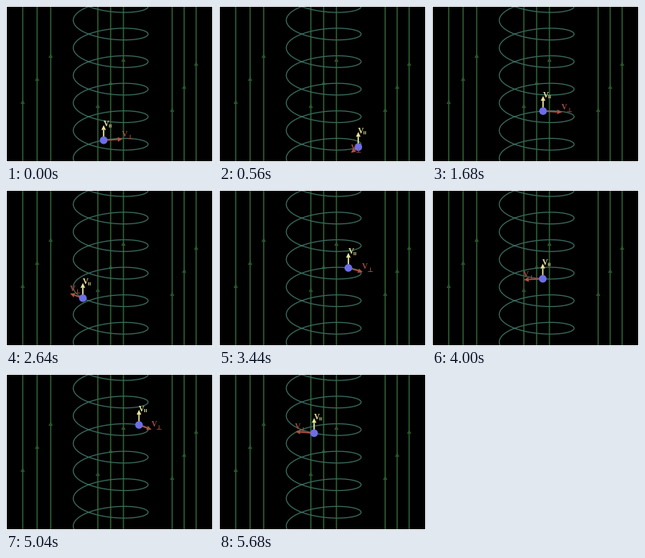
Recreate the animation shown at these times as a matplotlib script. Size 259 by 196 pixels, loop 5760 ms.

```python
import numpy as np
import matplotlib.pyplot as plt
from matplotlib.animation import FuncAnimation
from matplotlib.patches import Circle, Polygon, Rectangle

W, H, DPI = 259, 196, 64
PX = 72 / DPI  # points per pixel
FRAMES, INTERVAL = 72, 80

FIELD, HELIX, BALL = "#28562b", "#38695c", "#6c6ee8"
PARALLEL, PERP, PERP_TEXT = "#e8e59a", "#b4523f", "#a04a3a"

# Helix: centre, horizontal radius, tilt radius, base height, pitch
CX, RX, RY, BASE, PITCH = 131, 46.8, 15, 173.7, 34.6
SPEED = 24
UP = 19

# Phase of the particle along the helix
KEY_FRAMES = [0, 13, 21, 33, 43, 56, 71]
KEY_PHASES = [-1.76, 2.236, 4.883, 8.694, 11.716, 15.91, 20.68]

fig = plt.figure(figsize=(W / DPI, H / DPI), dpi=DPI, facecolor="black")
ax = fig.add_axes([0, 0, 1, 1])
ax.set_xlim(0, W)
ax.set_ylim(H, 0)
ax.axis("off")


def helix(phase):
    x = CX + RX * np.cos(phase)
    y = BASE - PITCH * phase / (2 * np.pi) + RY * np.sin(phase)
    return x, y


def stroke(color, width, z, x=(), y=()):
    line, = ax.plot(x, y, color=color, lw=width * PX, zorder=z,
                    solid_capstyle="butt", snap=False)
    return line


class Arrow:
    def __init__(self, color, z):
        self.shaft = stroke(color, 1.7, z)
        self.head = Polygon(np.zeros((3, 2)), fc=color, lw=0, zorder=z)
        ax.add_patch(self.head)

    def place(self, start, vec):
        start, vec = np.array(start), np.array(vec)
        length = np.hypot(*vec)
        unit = vec / length
        side = np.array([-unit[1], unit[0]]) * 2.9
        tip = start + vec
        neck = tip - unit * min(6, 0.7 * length)
        self.shaft.set_data([start[0], neck[0]], [start[1], neck[1]])
        self.head.set_xy([tip, neck + side, neck - side])


class Label:
    """Letter V with a subscript made of short strokes."""

    def __init__(self, color, strokes, shift, z):
        self.letter = ax.text(0, 0, "V", color=color, fontsize=10 * PX,
                              family="Liberation Serif", weight="bold",
                              ha="center", va="center_baseline", zorder=z)
        self.strokes = strokes
        self.shift = shift
        self.lines = [stroke(color, 0.9, z) for _ in strokes]

    def place(self, x, y):
        self.letter.set_position((x, y))
        sx, sy = x + self.shift[0], y + self.shift[1]
        for line, (x0, y0, x1, y1) in zip(self.lines, self.strokes):
            line.set_data([sx + x0, sx + x1], [sy + y0, sy + y1])


def draw_field():
    groups = [((20, 38, 55), 120), ((114, 130, 146), 125),
              ((207, 222, 237), 130)]
    for xs, top in groups:
        for i, x in enumerate(xs):
            x, y = x + 0.9, top - 29 * i + 0.5
            stroke(FIELD, 1.7, 1, [x, x], [1, H - 1])
            ax.add_patch(Polygon([(x, y - 3), (x - 2.7, y + 2.5),
                                  (x + 2.7, y + 2.5)],
                                 fc=FIELD, lw=0, zorder=1))


draw_field()
stroke(HELIX, 1.3, 2, *helix(np.linspace(-2 * np.pi, 12 * np.pi, 1400)))

# One-pixel white border
for x, y, w, h in [(0, 0, W, 1), (0, H - 1, W, 1),
                   (0, 0, 1, H), (W - 1, 0, 1, H)]:
    ax.add_patch(Rectangle((x, y), w, h, fc="white", lw=0, zorder=9))

up_arrow, perp_arrow = Arrow(PARALLEL, 4), Arrow(PERP, 4.5)
up_label = Label(PARALLEL, [(-1, -2, -1, 2), (1, -2, 1, 2)], (4.8, 3), 6)
perp_label = Label(PERP_TEXT, [(-3, 2.5, 3, 2.5), (0, -2.5, 0, 2.5)],
                   (6.5, 4), 7)
ball = ax.add_patch(Circle((0, 0), 4.8, fc=BALL, lw=0, zorder=5))


def update(frame):
    phase = np.interp(frame, KEY_FRAMES, KEY_PHASES)
    x, y = helix(phase)
    vx = -SPEED * np.sin(phase)
    vy = SPEED * RY / RX * np.cos(phase)
    ball.center = (x, y)
    up_arrow.place((x, y), (0, -UP))
    perp_arrow.place((x, y), (vx, vy))
    up_label.place(x + 3.3, y - UP - 2)
    perp_label.place(x + vx + 3, y + vy - 7)
    return []


anim = FuncAnimation(fig, update, frames=FRAMES, interval=INTERVAL,
                     repeat=True, repeat_delay=0, blit=False)
plt.show()
```
